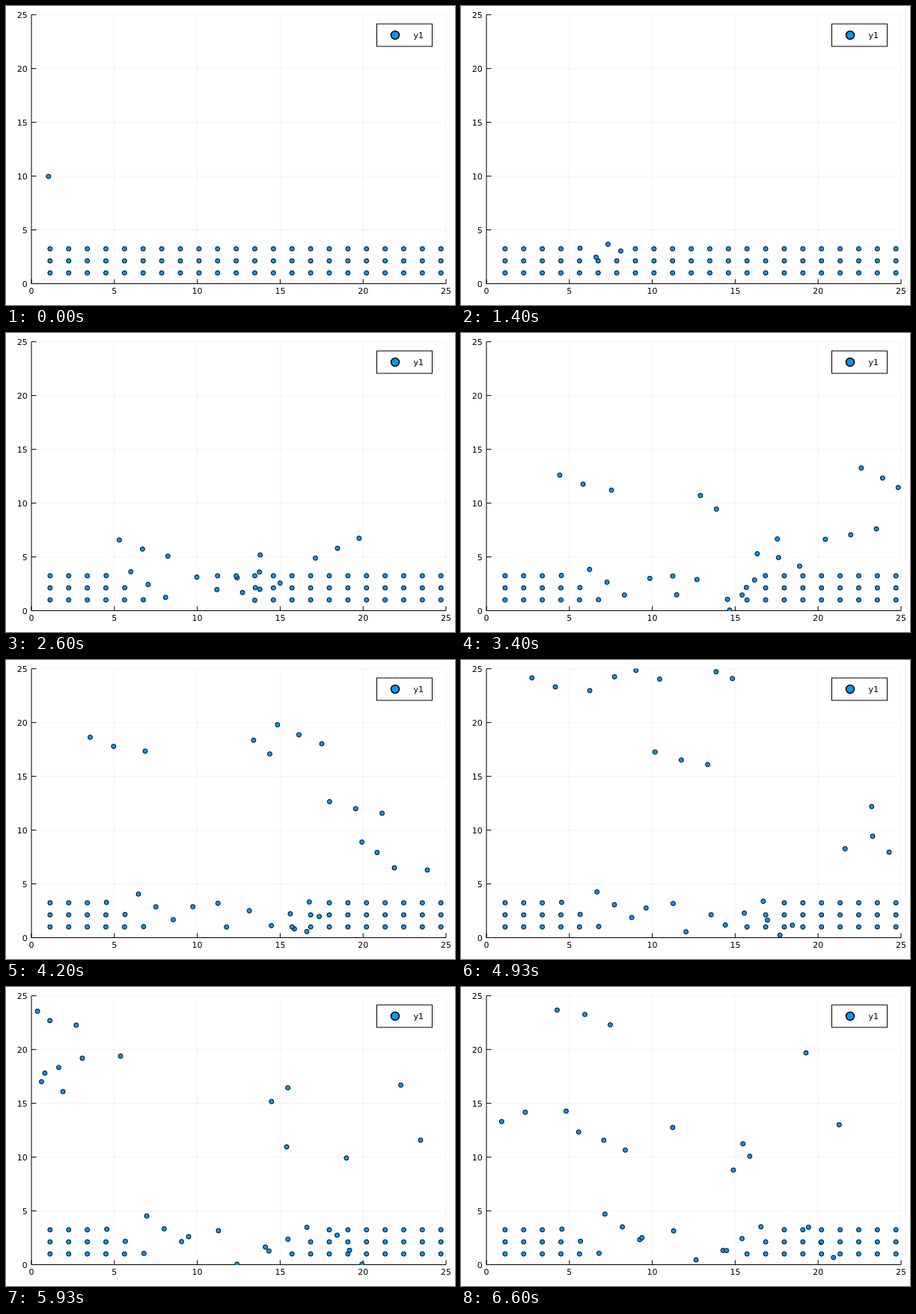
Animation of 600x400 px, one loop 6.67 s. Source, as an HTML page:

```html
<!DOCTYPE html>
<html lang="en">
<head>
<meta charset="utf-8">
<title>Particle scatter</title>
<style>
  html, body { margin: 0; width: 100%; height: 100%; overflow: hidden; background: #fff; }
  svg { display: block; width: 600px; height: 400px; }
  text { font: 11px "DejaVu Sans", sans-serif; fill: #000; }
  .grid { stroke: #000; stroke-opacity: .1; stroke-width: .5; }
  .axis { stroke: #000; stroke-width: 1; }
  circle { fill: #009afa; stroke: #000; stroke-width: 1; }
  .legend { fill: #fff; stroke: #000; stroke-width: 1; }
  .key { stroke-width: 1.5; }
</style>
</head>
<body>
<svg viewBox="0 0 600 400">
  <clipPath id="plot"><rect x="33.5" y="11.5" width="555" height="360.5"/></clipPath>
  <g id="axes"></g>
  <g id="dots" clip-path="url(#plot)"></g>
  <rect class="legend" x="495.5" y="24" width="74" height="30"/>
  <circle class="key" cx="520" cy="39" r="5.5"/>
  <text x="544.5" y="43">y1</text>
</svg>
<script>
const LEFT = 34, RIGHT = 588, TOP = 11.7, BOTTOM = 371.5;
const SIZE = 25;                 // side of the box
const SPACING = 2 ** (1 / 6);    // lattice constant
const COLS = 22, ROWS = 3;
const SPEED = 3, DT = .01, CUTOFF = 2.5;
const FRAMES = 100, STEPS = 10;  // time steps per frame
const LOOP = 6670;

const px = x => LEFT + x * (RIGHT - LEFT) / SIZE;
const py = y => BOTTOM - y * (BOTTOM - TOP) / SIZE;

function make(parent, name, attrs, label) {
  const el = document.createElementNS("http://www.w3.org/2000/svg", name);
  for (const key in attrs) el.setAttribute(key, attrs[key]);
  if (label !== undefined) el.textContent = label;
  return parent.appendChild(el);
}

function drawAxes() {
  const axes = document.getElementById("axes");
  const line = (cls, x1, y1, x2, y2) => make(axes, "line", { class: cls, x1, y1, x2, y2 });
  for (let v = 0; v <= SIZE; v += 5) {
    line("grid", px(v), TOP, px(v), BOTTOM);
    line("grid", LEFT, py(v), RIGHT, py(v));
    line("axis", px(v), BOTTOM, px(v), BOTTOM - 6);
    line("axis", LEFT, py(v), LEFT + 6.5, py(v));
    make(axes, "text", { x: px(v), y: 385, "text-anchor": "middle" }, v);
    make(axes, "text", { x: 28.7, y: py(v) + 4.2, "text-anchor": "end" }, v);
  }
  line("axis", LEFT, TOP, LEFT, BOTTOM);
  line("axis", LEFT, BOTTOM, RIGHT, BOTTOM);
}

// Light particles on a lattice; one heavy projectile that nothing deflects.
const projectile = { x: 1, y: 10, vx: SPEED, vy: -SPEED };
const light = [];
for (let row = 0; row < ROWS; row++)
  for (let col = 1; col <= COLS; col++)
    light.push({ x: col * SPACING, y: 1 + row * SPACING, vx: 0, vy: 0 });
const particles = [...light, projectile];

// Repulsion close by, attraction further out
const force = r => r < CUTOFF ? 24 * (2 / r ** 14 - 1 / r ** 8) : 0;

function move(p) {
  p.x += p.vx * DT;
  p.y += p.vy * DT;
  if (p.x < 0) p.vx = Math.abs(p.vx);
  if (p.x > SIZE) p.vx = -Math.abs(p.vx);
  if (p.y < 0) p.vy = Math.abs(p.vy);
  if (p.y > SIZE) p.vy = -Math.abs(p.vy);
}

function step() {
  for (const p of light) {
    const dx = p.x - projectile.x, dy = p.y - projectile.y;
    const r = Math.hypot(dx, dy);
    const kick = force(r) * DT / r;
    p.vx += kick * dx;
    p.vy += kick * dy;
  }
  particles.forEach(move);
}

// The whole run, worked out once
const frames = [];
step();
for (let n = 0; n < FRAMES; n++) {
  frames.push(particles.map(p => [px(p.x), py(p.y)]));
  for (let i = 0; i < STEPS; i++) step();
}

const group = document.getElementById("dots");
const dots = particles.map(() => make(group, "circle", { r: 3 }));

function draw(n) {
  dots.forEach((dot, i) => {
    const [x, y] = frames[n][i];
    dot.setAttribute("cx", x.toFixed(2));
    dot.setAttribute("cy", y.toFixed(2));
  });
}

// 15 frames per second, starting on whole hundredths
const frameAt = ms => Math.floor((Math.floor(ms / 10) * 10 + 4) * .015);

let origin = null, shown = 0;
function tick(now) {
  if (origin === null) origin = now;
  const n = frameAt(Math.max(0, now - origin) % LOOP);
  if (n !== shown) draw(shown = n);
  requestAnimationFrame(tick);
}
drawAxes();
draw(0);
requestAnimationFrame(tick);
</script>
</body>
</html>
```
